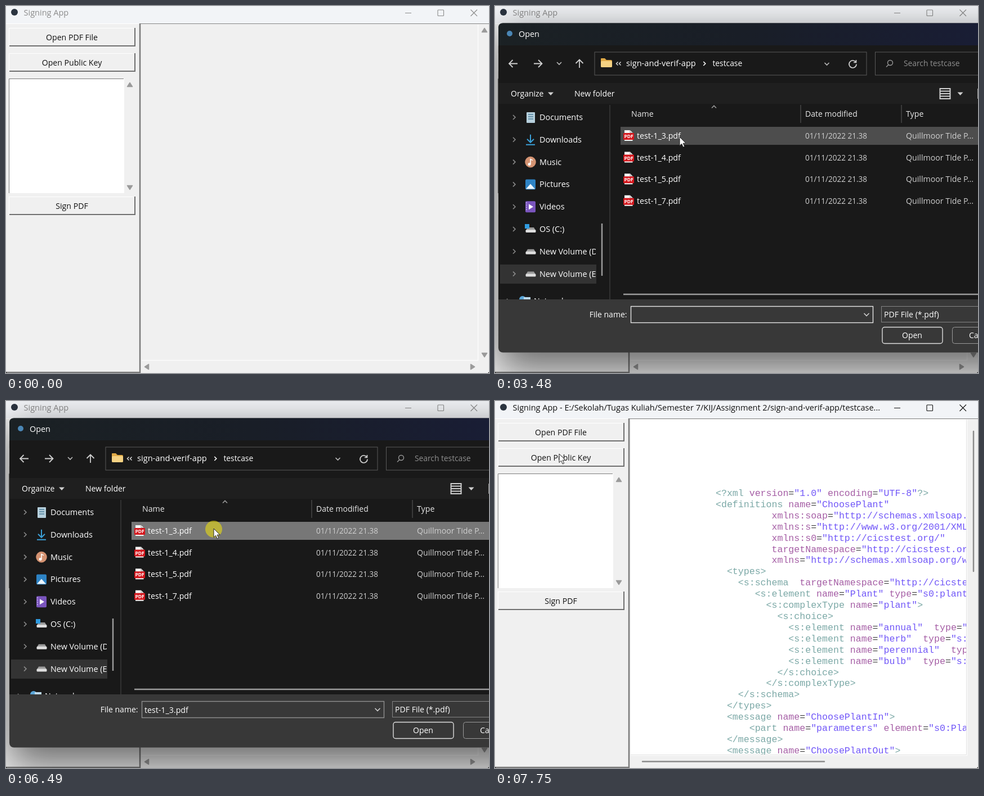
Recreate the animation shown at these times as an HTML page. Size 858 px wide and 653 px high, loop 8000 ms.

```html
<!DOCTYPE html>
<html lang="en">
<head>
<meta charset="utf-8">
<title>Signing App</title>
<style>
  html, body { margin: 0; height: 100%; overflow: hidden; background: #f0f0f0; }
  svg { display: block; width: 858px; height: 653px; font-family: "Open Sans", "Noto Sans", sans-serif; }
  text { white-space: pre; }
  .code { font: 16.58px "Liberation Mono", monospace; fill: #7ba8a6; }
  .code .attr { fill: #a55ea5; }
  .code .value { fill: #7157f8; }
  .code .eq { fill: #444; }
  .shadow { filter: blur(34px); opacity: .55; }
</style>
</head>
<body>
<svg id="stage" viewBox="0 0 858 653"></svg>
<script>
const text = (x, y, str, fill = '#111', size = 14.2, extra = '') =>
  `<text x="${x}" y="${y}" fill="${fill}" font-size="${size}" ${extra}>${str}</text>`;
const rect = (x, y, w, h, fill, extra = '') =>
  `<rect x="${x}" y="${y}" width="${w}" height="${h}" fill="${fill}" ${extra}/>`;
const stroke = (d, color, width = 1, extra = '') =>
  `<path d="${d}" fill="none" stroke="${color}" stroke-width="${width}" ${extra}/>`;
const shape = (d, fill) => `<path d="${d}" fill="${fill}"/>`;
const circle = (x, y, r, fill) => `<circle cx="${x}" cy="${y}" r="${r}" fill="${fill}"/>`;
const chevron = (x, y, angle, color = '#bbb', size = 4) =>
  stroke(`M${-size} ${-size / 2}L0 ${size / 2}L${size} ${-size / 2}`, color, 1.6,
    `transform="translate(${x} ${y}) rotate(${angle})"`);
const scrollArrow = (x, y, angle) =>
  `<path d="M0-3.5L4.5 3.5H-4.5Z" fill="#9b9b9b" stroke="#9b9b9b" stroke-width="1.5"
    stroke-linejoin="round" transform="translate(${x} ${y}) rotate(${angle})"/>`;
const times = (n, fn) => Array.from({ length: n }, (_, i) => fn(i)).join('');

// Main window
const button = (y, label, id = '') =>
  rect(5, y, 225, 33, '#f0f0f0') +
  stroke(`M5.5 ${y + 32}V${y + .5}H229`, '#fff') +
  `<path ${id} d="M6 ${y + 32}H229V${y}" fill="none" stroke="#707070" stroke-width="2"/>` +
  text(117, y + 21.5, label, '#111', 14.1, 'text-anchor="middle"');

const mainWindow =
  rect(0, 0, 858, 653, '#f0f0f0') + rect(0, 0, 858, 31, '#f2f4f7') +
  circle(15, 11, 6, '#2b3440') +
  `<g id="caption">${text(31.5, 17, 'Signing App', 'currentColor', 14.5, 'id="title"')}` +
  stroke('M709 12.5H720M825.5 6.5L837 18M837 6.5L825.5 18', 'currentColor', 1.1) +
  stroke('M768 7H776.500Q777.500 7 777.500 8V16.500Q777.500 17.500 776.500 17.500H768Q767 17.500 767 16.500V8Q767 7 768 7Z', 'currentColor', 1.1) +
  '</g>' +
  stroke('M0 31.500H237', '#fff') + stroke('M238 31.500H858', '#858585') +
  stroke('M0 652H238V31', '#7a7a7a', 2.5) +
  stroke('M838.500 33V630.500H241', '#fcfcfc', 1.5) +
  button(39, 'Open PDF File', 'id="openEdge"') + button(84, 'Open Public Key') + button(339, 'Sign PDF') +
  rect(5, 129, 205, 204, '#fff') + stroke('M5.500 333V129.500H209', '#7c7c7c') +
  scrollArrow(220, 140, 0) + scrollArrow(220, 323, 180) +
  `<g id="idleBars">${scrollArrow(850, 43, 0)}${scrollArrow(850, 621, 180)}` +
  `${scrollArrow(250, 642, -90)}${scrollArrow(829, 642, 90)}</g>` +
  shape('M0 651V653H2ZM858 651V653H856Z', '#222');

// Opened document: indent in characters, then the line
const listing = [
  [0, '<?xml version="1.0" encoding="UTF-8"?>'],
  [0, '<definitions name="ChoosePlant"'],
  [10, 'xmlns:soap="http://schemas.xmlsoap.org/wsdl/soap/"'],
  [10, 'xmlns:s="http://www.w3.org/2001/XMLSchema"'],
  [10, 'xmlns:s0="http://cicstest.org/"'],
  [10, 'targetNamespace="http://cicstest.org/"'],
  [10, 'xmlns="http://schemas.xmlsoap.org/wsdl/">'],
  [2, '<types>'],
  [4, '<s:schema  targetNamespace="http://cicstest.org/">'],
  [7, '<s:element name="Plant" type="s0:plant"/>'],
  [9, '<s:complexType name="plant">'],
  [11, '<s:choice>'],
  ...['annual', 'herb', 'perennial', 'bulb'].map(n => [13, `<s:element name="${n}"  type="s:string"/>`]),
  [11, '</s:choice>'],
  [9, '</s:complexType>'],
  [4, '</s:schema>'],
  [2, '</types>'],
  [2, '<message name="ChoosePlantIn">'],
  [6, '<part name="parameters" element="s0:Plant"/>'],
  [2, '</message>'],
  [2, '<message name="ChoosePlantOut">'],
];
const highlight = line => line.replace(/</g, '&lt;').replace(/([\w:]+)=("[^"]*")/g,
  '<tspan class="attr">$1</tspan><tspan class="eq">=</tspan><tspan class="value">$2</tspan>');

const documentView =
  '<clipPath id="page"><rect x="241" y="33" width="596" height="596"/></clipPath>' +
  rect(241, 33, 597, 597, '#fff') + '<g clip-path="url(#page)">' +
  listing.map(([indent, line], i) =>
    `<text class="code" x="${392 + indent * 9.95}" y="${169 + i * 19.91}">${highlight(line)}</text>`).join('') +
  '</g>' + stroke('M837.500 33V629.500H241', '#e2e2e2') +
  stroke('M850 54V303M262 641.500H585', '#8b8b8b', 2.5, 'stroke-linecap="round"');

// File dialog
const white = '#fff', grey = '#cfcfcf';
const drive = y => shape(`M58 ${y - 4}H69L72 ${y + 1}H55Z`, '#9a9a9a') + rect(54.5, y, 18, 5, '#dedede', 'rx="1.5"');
const places = [
  ['Documents', y => rect(56, y - 9, 15, 19, '#b7d0dd', 'rx="1"') +
    stroke(`M59 ${y - 5}H68M59 ${y - 1}H68M59 ${y + 3}H68`, '#4b7d99', 1.6)],
  ['Downloads', y => stroke(`M63 ${y - 9}V${y + 4}M57 ${y - 1}L63 ${y + 5}L69 ${y - 1}M55 ${y + 9}H71`, '#3ba0d8', 2)],
  ['Music', y => circle(63, y, 9.8, '#d49372') + circle(61, y + 4, 2.5, '#fff') +
    stroke(`M63 ${y + 4}V${y - 5}L67 ${y - 3}`, '#fff', 1.6)],
  ['Pictures', y => rect(54, y - 9, 18, 18, '#2d83c5', 'rx="2"') + shape(`M55 ${y + 8}L63 ${y - 1}L71 ${y + 8}Z`, '#eef6fb')],
  ['Videos', y => rect(54, y - 10, 18, 20, '#7a55bd', 'rx="2"') + shape(`M60 ${y - 5}V${y + 5}L68 ${y}Z`, '#fff') +
    stroke(`M56 ${y - 8}V${y + 8}`, '#c9b5ee', 1.5, 'stroke-dasharray="2 2"')],
  ['OS (C:)', y => drive(y + 1) + rect(53, y - 9, 8, 8, '#2f9be0')],
  ['New Volume (D:)', drive],
  ['New Volume (E:)', drive],
];
const fileNames = [3, 4, 5, 7].map(n => `test-1_${n}.pdf`);
const rowY = i => 231 + i * 38.6;

const dialog =
  '<clipPath id="tree"><rect x="6" y="174" width="173" height="348"/></clipPath>' +
  '<linearGradient id="bar"><stop offset="0" stop-color="#1b2124"/><stop offset=".45" stop-color="#191e27"/>' +
  '<stop offset="1" stop-color="#191d38"/></linearGradient>' +
  rect(6, 48, 1000, 600, '#000', 'class="shadow"') +
  rect(6, 30.5, 960, 586, '#383838', 'rx="8"') +
  shape('M6 71V38.500Q6 30.500 14 30.500H960V71Z', 'url(#bar)') +
  rect(6, 70, 960, 452, '#191919') + rect(6, 137, 960, 37, '#1f1f1f') +
  `<g id="dialogIcon">${circle(26, 49, 5, '#4a86b5')}</g>` +
  text(42, 54.5, 'Open', white, 14.4, 'id="dialogTitle"') +
  // navigation bar
  stroke('M40 102.500H25M31.500 96L25 102.500L31.500 109M69 102.500H83M77 96L83.500 102.500L77 109M150 110V96M143.500 102L150 95.500L156.500 102', grey, 1.8) +
  chevron(114, 102, 0) + rect(177, 82, 483, 41, 'none', 'stroke="#5a5a5a"') +
  shape('M188 94Q188 93 189 93H195L198 96H206Q208 96 208 98V107Q208 109 206 109H190Q188 109 188 107Z', '#e0aa47') +
  rect(188, 98, 20, 11, '#f5d283', 'rx="2"') +
  chevron(217, 102.500, 90, grey, 3) + chevron(222, 102.500, 90, grey, 3) +
  text(233, 107, 'sign-and-verif-app', white, 14.6) + chevron(372, 102.500, -90, white, 3.5) +
  text(386.500, 107, 'testcase', white, 13.8) + chevron(589.500, 103, 0) +
  stroke('M641 100A6.500 6.500 0 1 0 642 103.500M641.500 96V100.500H637', grey, 1.7) +
  rect(675.500, 82, 300, 41, 'none', 'stroke="#5a5a5a"') +
  '<circle cx="702" cy="101" r="4.500" fill="none" stroke="#999" stroke-width="1.4"/>' +
  stroke('M699 104.500L695 108.500', '#999', 1.4) + text(726, 107, 'Search testcase', '#8f8f8f', 13.8) +
  // command bar
  text(28, 160.500, 'Organize', white, 14) + shape('M94 153.500H104L99 159Z', grey) +
  text(141, 160.500, 'New folder', white, 14) +
  stroke('M790.500 147H808.500V165H790.500ZM791 151.500H808M791 156H808M791 160.500H808', '#d0d0d0', 2) +
  shape('M821.500 153.500H831.500L826.500 159Z', grey) + rect(857.500, 147.500, 18, 17, '#eee', 'stroke="#aaa"') +
  // folder tree
  rect(9, 460, 171, 34, '#333') + '<g clip-path="url(#tree)">' +
  places.map(([name, icon], i) => {
    const y = 198 + i * 39.8;
    return chevron(34, y, -90, '#8a8a8a') + icon(y) + text(79, y + 5, name, white, 14.4);
  }).join('') +
  chevron(23, 525, -90, '#8a8a8a') + circle(49, 522, 6, '#5aa6d8') + rect(51, 518, 12, 8, '#bcd8ea') +
  text(69, 530, 'Network', white) + '</g>' +
  stroke('M190 387V480M228 513H858', '#9b9b9b', 2.5) + stroke('M204 176V522', '#303030', 2) +
  // file list
  stroke('M543 176V208M722 176V208', '#5c5c5c') + chevron(389, 179.500, 180, '#999') +
  text(242, 196.500, 'Name', '#e8e8e8') + text(551, 196.500, 'Date modified', '#e8e8e8', 14) +
  text(730, 196.500, 'Type', '#e8e8e8') +
  rect(223, 215, 640, 32, '#4d4d4d', 'id="rowGlow"') +
  times(4, i => {
    const y = rowY(i);
    return shape(`M230 ${y - 10}H240L244.500 ${y - 5.5}V${y + 9}H230Z`, '#f7f7f7') +
      stroke(`M240 ${y - 10}V${y - 5.5}H244.500`, '#999') +
      text(252, y + 5, fileNames[i], white) +
      text(551, y + 5, '01/11/2022 21.38', grey, 13.55) + text(730, y + 5, 'Quillmoor Tide P...', grey);
  }) +
  `<g id="badges">${times(4, i => rect(228, rowY(i) - 5, 19, 12, '#d4161c', 'rx="1"') +
    text(237.500, rowY(i) + 4.2, 'PDF', '#fff', 8.4, 'text-anchor="middle" font-weight="700"'))}</g>` +
  // bottom panel
  text(234.500, 553.500, 'File name:', white, 14, 'text-anchor="end"') +
  rect(241.500, 534.500, 430, 29, '#383838', 'id="nameBox" stroke-width="1.4"') +
  text(246, 554.500, fileNames[0], white, 14.2, 'id="nameText"') +
  rect(246.500, 541, 1.2, 18, '#fff', 'id="caret"') + chevron(660, 549, 0, grey, 4.5) +
  rect(686.500, 534.500, 300, 28, '#383838', 'stroke="#858585"') + text(691, 553.500, 'PDF File (*.pdf)', white, 14.1) +
  rect(688, 571.500, 107, 29, '#383838', 'rx="4" stroke="#ddd" stroke-width="1.4"') +
  text(741, 591, 'Open', white, 14, 'text-anchor="middle"') +
  rect(812.500, 571.500, 107, 29, '#383838', 'rx="4" stroke="#9a9a9a"') + text(842, 591, 'Cancel', white, 14) +
  `<g id="tip">${rect(328.500, 254.500, 255, 62, '#2b2b2b', 'stroke="#7a7a7a"')}` +
  text(335, 271.500, 'Type: Quillmoor Tide PDF Document', white) + text(335, 290, 'Size: 10,4 KB', white, 14) +
  text(335, 308.500, 'Date modified: 01/11/2022 21.38', white, 13.8) + '</g>';

document.getElementById('stage').innerHTML =
  mainWindow + `<g id="doc">${documentView}</g><g id="dialog">${dialog}</g>` +
  '<circle id="click" r="15" fill="#e9dc14" fill-opacity=".6"/>' +
  '<path id="cursor" d="M0 0V15.500L3.600 12.200L6.200 18L8.700 16.900L6.200 11.200H11Z" fill="#fff" stroke="#222"/>';

const $ = id => document.getElementById(id);
const show = (id, on) => { $(id).style.display = on ? '' : 'none'; };

// Pointer stops: step, x, y
const stops = [
  [1, 430, 487], [5, 122, 72], [6, 111, 56], [11, 111, 56], [14, 328, 233],
  [19, 328, 233], [21, 369, 227], [28, 369, 227], [31, 114, 94],
];
function pointerAt(step) {
  const next = stops.findIndex(s => s[0] >= step);
  if (next < 1) return stops[0].slice(1);
  const [a, b] = [stops[next - 1], stops[next]];
  const u = (step - a[0]) / (b[0] - a[0]), ease = u * u * (3 - 2 * u);
  return [1, 2].map(i => a[i] + (b[i] - a[i]) * ease);
}

const LOOP = 8000, STEP = 250, PATH = 'E:/Sekolah/Tugas Kuliah/Semester 7/KIJ/Assignment 2/sign-and-verif-app/testcase...';
let shown = -1;

function draw() {
  // The screen updates four times a second
  const step = Math.min(31, Math.floor((performance.now() % LOOP + 30) / STEP));
  if (step !== shown) render(shown = step);
  requestAnimationFrame(draw);
}

function render(step) {
  const within = (from, to) => step >= from && step <= to;
  const closing = step === 27, loaded = step >= 29, selected = step >= 21;

  $('caption').style.color = within(1, 7) || step >= 27 ? '#111' : '#8b8b8b';
  $('title').textContent = 'Signing App' + (loaded ? ' - ' + PATH : '');
  $('openEdge').style.stroke = step === 6 ? '#fff' : '#707070';
  show('doc', loaded);
  show('idleBars', !loaded);

  show('dialog', within(10, 27));
  const scale = closing ? .982 : step === 10 ? .9965 : 1;
  $('dialog').setAttribute('transform', `translate(396 294) scale(${scale}) translate(-396 -294)`);
  $('dialog').setAttribute('opacity', closing ? .64 : 1);
  show('dialogIcon', !closing);
  $('dialogTitle').setAttribute('x', closing ? 17 : 42);
  show('badges', step > 10);
  show('rowGlow', step >= 14);
  $('rowGlow').setAttribute('fill', selected ? '#777' : '#4d4d4d');
  $('nameBox').setAttribute('stroke', step >= 22 ? '#8f8f8f' : '#e6e6e6');
  show('nameText', selected);
  show('caret', !selected && (Math.max(step, 11) - 9 >> 1) & 1);
  show('tip', within(17, 19));

  const [x, y] = pointerAt(step);
  show('cursor', step > 0);
  $('cursor').setAttribute('transform', `translate(${x} ${y})`);
  show('click', within(6, 7) || within(22, 23) || within(26, 27));
  $('click').setAttribute('transform', `translate(${x} ${y + 1})`);
}
draw();
</script>
</body>
</html>
```
